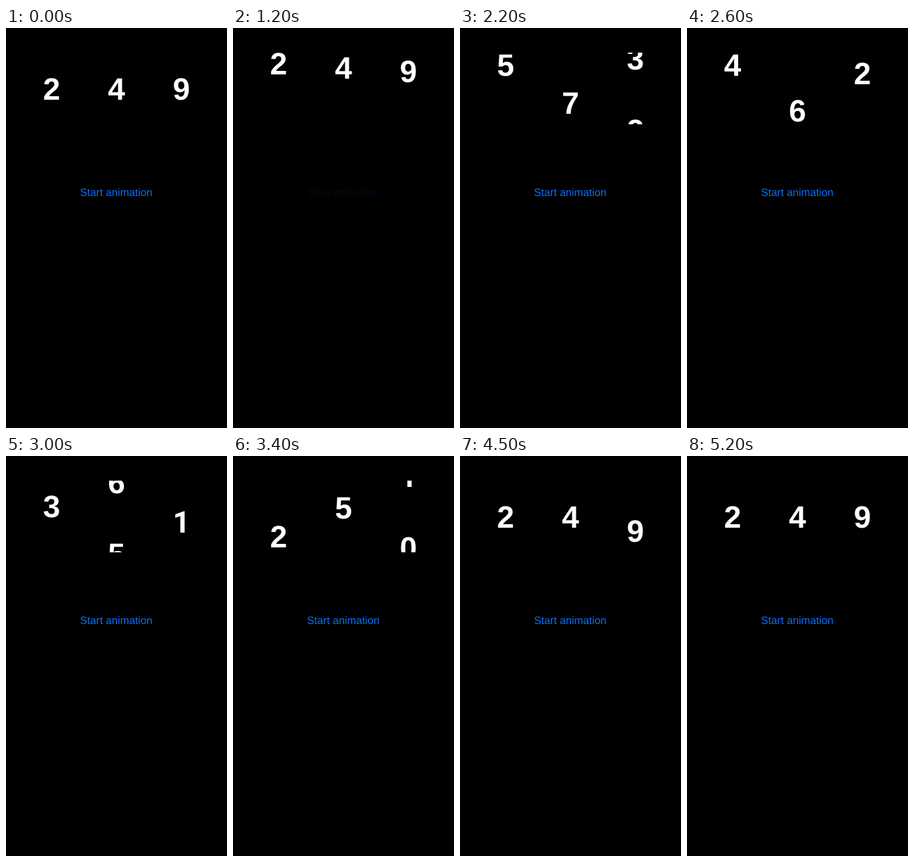
Recreate the animation shown at these times as an HTML page. Size 315 px wide and 569 px high, loop 6200 ms.

```html
<!DOCTYPE html>
<html lang="en">
<head>
<meta charset="utf-8">
<title>Number scroll</title>
<style>
  html, body { margin: 0; width: 100%; height: 100%; overflow: hidden; background: #000; }
  svg { display: block; width: 315px; height: 569px; }
  text {
    font-family: "Liberation Sans", Arial, sans-serif;
    text-anchor: middle;
    text-rendering: geometricPrecision;
  }
  .digit { font-size: 44px; font-weight: bold; fill: #fff; }
  /* a one without a foot */
  .one { font-family: Roboto, sans-serif; font-size: 43px; }
  .button { font-size: 15.35px; fill: #086efa; }
</style>
</head>
<body>
<svg viewBox="0 0 315 569">
  <clipPath id="window"><rect y="35" width="315" height="102"/></clipPath>
  <g id="reels" clip-path="url(#window)"></g>
  <text class="button" id="button" x="157.2" y="239">Start animation</text>
</svg>
<script>
const LOOP = 6200, STEP = 100;
const PRESS = 800, RELEASE = 1200, FADE = 930, DIM = 0.1;
const ROW = 102, BASELINE = 102, EXTRA = 5;
const SVG = 'http://www.w3.org/2000/svg';

const clamp = v => Math.min(1, Math.max(0, v));

// cubic-bezier(0, 0, 0.58, 1)
function easeOut(x) {
  if (x <= 0 || x >= 1) return clamp(x);
  let lo = 0, hi = 1;
  for (let i = 0; i < 30; i++) {
    const s = (lo + hi) / 2;
    if (1.74 * s * s * (1 - s) + s ** 3 < x) lo = s; else hi = s;
  }
  return lo * lo * (3 - 2 * lo);
}

// Each reel shows its digit, then counts down to the same digit again.
function makeReel([digit, x, duration]) {
  const group = document.createElementNS(SVG, 'g');
  for (let row = 0; row <= EXTRA + 1; row++) {
    const value = row ? (digit + EXTRA + 1 - row) % 10 : digit;
    const text = document.createElementNS(SVG, 'text');
    text.setAttribute('class', value === 1 ? 'digit one' : 'digit');
    text.setAttribute('x', x);
    text.setAttribute('y', BASELINE + row * ROW);
    text.textContent = value;
    group.append(text);
  }
  document.getElementById('reels').append(group);
  return { group, duration };
}

const reels = [[2, 65, 2700], [4, 157.5, 3300], [9, 250, 3900]].map(makeReel);
const button = document.getElementById('button');

// The first moments of the scroll run slightly slow.
function scrollTime(t) {
  if (t < RELEASE) return 0;
  return t < 1800 ? 96 + (t - RELEASE) * 550 / 600 : t - 1154;
}

function draw(t) {
  const elapsed = scrollTime(t);
  for (const { group, duration } of reels) {
    const shift = easeOut(elapsed / duration) * (EXTRA + 1) * ROW;
    group.setAttribute('transform', `translate(0 ${-shift})`);
  }
  const fade = clamp((t - RELEASE) / FADE);
  button.setAttribute('opacity', t < PRESS ? 1 : DIM + (1 - DIM) * fade);
}

const start = performance.now();
function tick() {
  const t = (performance.now() - start) % LOOP;
  draw(Math.floor(t / STEP) * STEP);
  requestAnimationFrame(tick);
}
tick();
</script>
</body>
</html>
```
